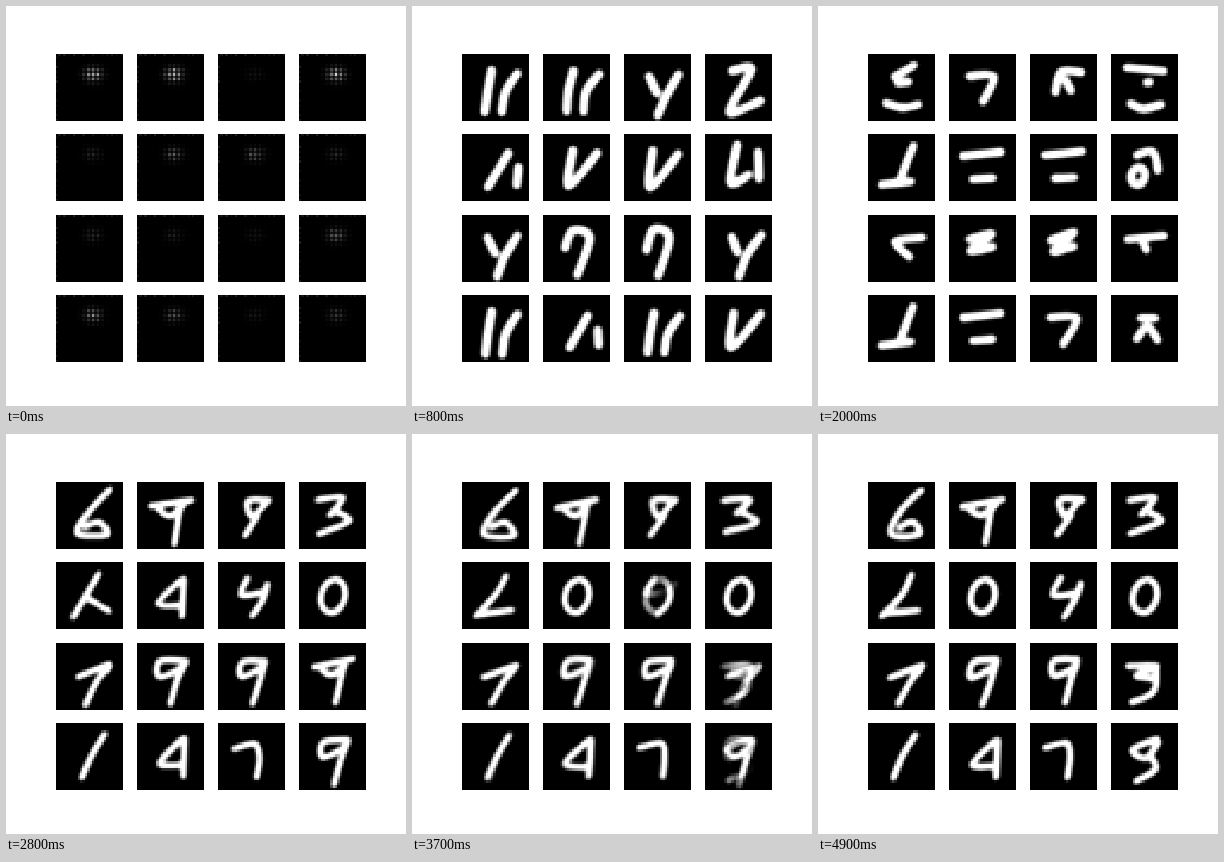
An HTML page with a canvas for the animation above (5100 ms loop, 400 px wide and 400 px high).

```html
<!DOCTYPE html>
<html lang="en">
<head>
<meta charset="utf-8">
<title>Digit generator training</title>
<style>
html, body { margin: 0; width: 100%; height: 100%; overflow: hidden; background: #fff; }
canvas { display: block; width: 400px; height: 400px; image-rendering: pixelated; }
</style>
</head>
<body>
<canvas id="stage" width="400" height="400"></canvas>
<script>
const N = 28, CELL = 67, STEP = 100, STEPS = 50, LOOP = 5100;
const X = [50, 131, 212, 293], Y = [48, 128, 209, 289];

// Strokes are runs of x y points, split by "/"; "o" is an ellipse: centre and radii.
const digits = {
  six: "54 8 32 30 22 52 52 53 44 40 30 46",
  nine: "48 17 24 18 23 34 46 24/48 18 41 38 34 61",
  crown: "14 25 54 17/22 28 32 33 46 22/44 24 36 61",
  eight: "52 18 29 18 34 34 50 18/40 34 26 53",
  three: "18 18 45 16 31 32/36 29 51 40 20 51",
  ell: "44 13 34 32 14 54/18 52 50 48",
  zero: "o 34 34 12 17",
  four: "30 16 22 33 46 30/50 22 44 38 34 54",
  seven: "22 34 54 22/54 24 42 38 30 61",
  five: "18 24 45 22 26 33 44 35/46 24 42 48 22 60",
  one: "48 12 36 32 26 56",
  bee: "44 18 22 41 44 43/48 16 46 54",
  two: "16 25 37 20 41 34 38 54"
};
const slashes = {
  pair: "30 17 26 38 24 58/56 20 44 38 41 58",
  wye: "26 22 32 38/56 20 42 40 34 60",
  zed: "27 16 46 15 24 57 56 47",
  cross: "46 20 26 52/56 34 55 50",
  you: "29 17 26 53 55 20",
  bar: "33 11 25 48 43 42/54 18 54 44",
  hook: "23 34 30 15 46 22 34 60",
  aitch: "44 12 18 56/32 36 54 50",
  curl: "46 16 21 26 34 35 48 18/40 33 44 46 24 58"
};
const blobs = {
  dish: "46 12 26 24/30 30 40 29/18 50 34 55 50 50",
  pee: "20 23 46 23 34 48",
  roof: "52 18 32 18 24 37/36 26 42 37",
  eye: "16 14 52 18/36 29 38 29/20 50 30 56 50 51",
  stair: "46 12 38 28 32 44/14 51 42 48",
  stack: "14 22 52 18/24 45 44 44",
  bulb: "26 20 42 18 48 36/o 27 42 7 9",
  cee: "54 22 26 26 42 42",
  zig: "20 25 44 18 22 36 44 32",
  tee: "16 24 54 20/32 28 36 34",
  cloud: "30 22 44 24/26 43 36 32 46 44"
};
const shapes = { ...digits, ...slashes, ...blobs };

// Step, stroke width and the shape in each cell, row by row.
const poses = [
  { at: 8, width: 8.5, cells: "pair pair wye zed cross you you bar wye hook hook wye pair cross pair you" },
  { at: 20, width: 8, cells: "dish pee roof eye stair stack stack bulb cee zig zig tee stair stack pee cloud" },
  { at: 28, width: 6, cells: "six crown eight three aitch bee four zero seven nine nine crown one bee two nine" },
  { at: 33, width: 6, cells: "six crown eight three ell zero zero zero seven nine nine seven one bee two nine" },
  { at: 42, width: 6, cells: "six crown eight three ell zero four zero seven nine nine five one bee two curl" },
  { at: 49, width: 6.3, cells: "six crown eight three ell zero four zero seven nine nine five one bee two curl" }
];

// Brightness of the first faint activations, one per cell.
const glow = [.9, 1, .1, .95, .18, .42, .45, .2, .22, .16, .1, .55, .6, .4, .12, .3];

const stage = document.getElementById("stage").getContext("2d");
const tile = document.createElement("canvas");
tile.width = tile.height = N;
const pen = tile.getContext("2d", { willReadFrequently: true });
const clamp = v => Math.max(0, Math.min(1, v));
const ease = v => v * v * (3 - 2 * v);
const hash = (a, b, c) => {
  const s = Math.sin(a * 12.99 + b * 78.23 + c * 37.72) * 43758.55;
  return s - Math.floor(s);
};
const field = fn => Float32Array.from({ length: N * N }, (_, i) => fn(i % N, Math.floor(i / N)));

// Smooth curve through every point.
function curve(q) {
  const p = [];
  for (let i = 0; i < q.length; i += 2) p.push([q[i], q[i + 1]]);
  const at = i => p[Math.max(0, Math.min(p.length - 1, i))];
  const lean = (i, s, k) => at(i)[k] + s * (at(i + 1)[k] - at(i - 1)[k]) / 6;
  pen.moveTo(...p[0]);
  for (let i = 1; i < p.length; i++) {
    pen.bezierCurveTo(lean(i - 1, 1, 0), lean(i - 1, 1, 1), lean(i, -1, 0), lean(i, -1, 1), ...p[i]);
  }
}

function drawStroke(text, jitter) {
  const words = text.split(" ");
  pen.beginPath();
  if (words[0] === "o") {
    const [x, y, rx, ry] = words.slice(1).map(Number);
    pen.ellipse(x, y, rx, ry, .25, 0, 2 * Math.PI);
  } else {
    curve(words.map((w, i) => Number(w) + jitter(i)));
  }
  pen.stroke();
}

// Rasterise a shape on the small grid and soften its edge.
function glyph(name, width, cell, seed) {
  pen.setTransform(1, 0, 0, 1, 0, 0);
  pen.fillStyle = "#000";
  pen.fillRect(0, 0, N, N);
  pen.scale(N / CELL, N / CELL);
  pen.strokeStyle = "#fff";
  pen.lineCap = pen.lineJoin = "round";
  pen.lineWidth = width;
  const jitter = i => 2.4 * (hash(i, cell, seed) - .5);
  shapes[name].split("/").forEach(s => drawStroke(s, jitter));
  const d = pen.getImageData(0, 0, N, N).data;
  const at = (x, y) => x < 0 || y < 0 || x >= N || y >= N ? 0 : d[(y * N + x) * 4] / 255;
  return field((x, y) => {
    let sum = 0;
    for (let j = -1; j < 2; j++)
      for (let i = -1; i < 2; i++) sum += at(x + i, y + j) * (2 - Math.abs(i)) * (2 - Math.abs(j));
    return clamp((sum / 16 - .14) / .64);
  });
}

// Faint dotted lattice with a bright spot above the centre.
function lattice(amp, seed) {
  return field((x, y) => {
    const spot = Math.exp(-(((x - 15) / 3.4) ** 2) - ((y - 8) / 2.9) ** 2);
    const dots = (x % 2 ? 1 : .3) * (y % 2 ? .3 : 1) * (.6 + .4 * hash(x, y, seed));
    const rim = (y === 0 && x % 2) || (x === 0 && y % 2) ? .13 : 0;
    return Math.min(1, amp * spot * dots + rim * hash(x, y, 3));
  });
}

const keys = [
  { at: 0, cells: glow.map(lattice) },
  ...poses.map(({ at, width, cells }) => ({
    at, cells: cells.split(" ").map((name, c) => glyph(name, width, c, at))
  }))
];

// Smooth order in which regions of a tile change over.
const delay = (x, y, seed) =>
  .5 + .25 * (Math.sin(x * .31 + seed * 2.1) + Math.sin(y * .37 + x * .12 + seed * 1.3));

function paint(step) {
  let k = 0;
  while (k < keys.length - 2 && step >= keys[k + 1].at) k++;
  const a = keys[k], b = keys[k + 1];
  const p = (step - a.at) / (b.at - a.at);
  const grain = k === 0 ? .25 * Math.sin(Math.PI * p) : 0;
  const img = pen.createImageData(N, N);
  stage.fillStyle = "#fff";
  stage.fillRect(0, 0, 400, 400);
  stage.imageSmoothingEnabled = false;
  a.cells.forEach((from, c) => {
    const to = b.cells[c];
    for (let i = 0; i < N * N; i++) {
      const x = i % N, y = Math.floor(i / N);
      const m = ease(clamp((p - .4 * delay(x, y, c + k)) / .6));
      const v = (from[i] + (to[i] - from[i]) * m) * (1 - grain * hash(x, y, step + c));
      img.data.fill(Math.round(v * 255), i * 4, i * 4 + 3);
      img.data[i * 4 + 3] = 255;
    }
    pen.putImageData(img, 0, 0);
    stage.drawImage(tile, X[c % 4], Y[Math.floor(c / 4)], CELL, CELL);
  });
}

const start = performance.now();
let shown = -1;
function tick(now) {
  const t = Math.max(0, now - start) % LOOP;
  const step = Math.min(STEPS - 1, Math.floor(t / STEP));
  if (step !== shown) paint(shown = step);
  requestAnimationFrame(tick);
}
tick(start);
</script>
</body>
</html>
```
